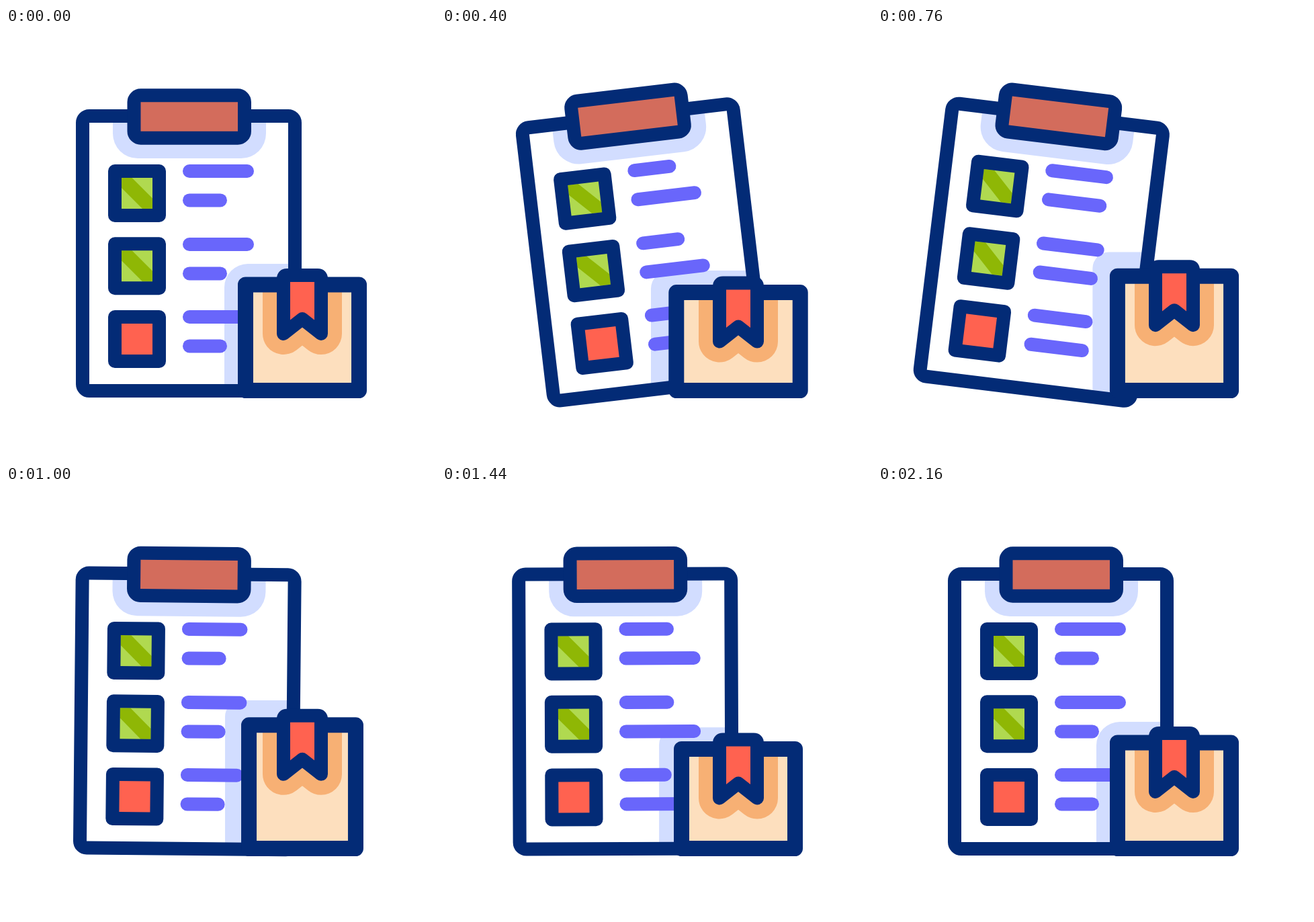
Animation, 640 px wide and 640 px high, one loop 2.24 s. Source, as an HTML page with a canvas:

```html
<!DOCTYPE html>
<html lang="en">
<head>
<meta charset="utf-8">
<title>Checklist and parcel</title>
<style>
html, body { margin: 0; width: 100%; height: 100%; overflow: hidden; background: #fff; }
canvas { display: block; width: 640px; height: 640px; }
</style>
</head>
<body>
<canvas id="stage" width="640" height="640"></canvas>
<script>
const ctx = document.getElementById('stage').getContext('2d');
const LOOP = 2240, STEP = 40;
const NAVY = '#032b76', PALE = '#d2ddff', VIOLET = '#6966fb', RED = '#ff6250';
const PIVOT = [272, 100];

// Eased value through [times], [values], held at both ends
function track(times, values) {
  return t => {
    if (t <= times[0]) return values[0];
    const i = times.findIndex(k => k > t);
    if (i < 0) return values[values.length - 1];
    const x = (t - times[i - 1]) / (times[i] - times[i - 1]);
    return values[i - 1] + (values[i] - values[i - 1]) * x * x * (3 - 2 * x);
  };
}

const swing = track([0, 370, 755, 1170, 1620, 1960], [0, 7, -7, 3.2, -1.4, 0]);
const longLine = track([0, 430, 860, 1290, 1720], [106, 72, 106, 72, 106]);
const shortLine = track([120, 560, 990, 1410, 1820], [66, 122, 66, 122, 66]);

const beats = [200, 490, 940, 1390, 1700];
const boxDrop = track(beats, [0, 15, -28, 10.2, 0]);
const boxWiden = track(beats, [0, 10, -5.3, 0, 0]);
const shadeLeft = track(beats, [325, 306.8, 326.2, 323, 325]);
const shadeTop = track(beats, [351, 364, 317, 360, 351]);
const shadeRadius = track(beats, [35, 25, 24, 25, 35]);

const ribbon = new Path2D('M418 368H464q5 0 5 5V455L441 433 413 455V373q0-5 5-5Z');

function box(x, y, w, h, r = 0) {
  const p = new Path2D();
  p.roundRect(x, y, w, h, r);
  return p;
}

const board = box(114, 131, 316, 409, 10);
const clipPlate = box(190.5, 100.3, 164.5, 63.4, 10);
const clipShade = box(159, 120, 228, 74, [0, 0, 37, 37]);

function fill(path, color) {
  ctx.fillStyle = color;
  ctx.fill(path);
}

function stroke(path, color, width) {
  ctx.strokeStyle = color;
  ctx.lineWidth = width;
  ctx.stroke(path);
}

function turn(angle) {
  ctx.translate(...PIVOT);
  ctx.rotate(angle);
  ctx.translate(-PIVOT[0], -PIVOT[1]);
}

function bar(y, length) {
  stroke(new Path2D(`M273 ${y}h${length - 20}`), VIOLET, 20);
}

function checkbox(y, done) {
  const square = box(162, y, 66, 66);
  fill(square, done ? '#b0d950' : RED);
  if (done) {
    fill(new Path2D(`M172 ${y + 10}h15.5l30.5 30.5v15.5h-15l-31-31Z`), '#8fb705');
  }
  stroke(square, NAVY, 20);
}

function drawBoard(t) {
  const angle = -swing(t) * Math.PI / 180;
  ctx.save();
  turn(angle);
  fill(board, '#fff');

  // The parcel's shadow stays upright but shows only on the board
  ctx.save();
  ctx.clip(board);
  fill(clipShade, PALE);
  turn(-angle);
  fill(box(shadeLeft(t), shadeTop(t), 300, 300, [shadeRadius(t), 0, 0, 0]), PALE);
  ctx.restore();

  [213, 322, 430].forEach((y, i) => {
    bar(y, longLine(t) - (i === 2 ? 4 : 0));
    bar(y + 43.4, shortLine(t));
  });
  [213, 321.3, 430].forEach((y, i) => checkbox(y, i < 2));
  stroke(board, NAVY, 20);
  fill(clipPlate, '#d36c5c');
  stroke(clipPlate, NAVY, 20);
  ctx.restore();
}

function drawParcel(t) {
  const drop = boxDrop(t), wide = boxWiden(t);
  const body = box(356.5 - wide, 382 + drop, 169 + 2 * wide, 157.5 - drop);
  fill(body, '#fddfbe');
  ctx.save();
  ctx.clip(body);
  ctx.translate(0, drop);
  stroke(ribbon, '#f7b074', 62);
  ctx.restore();
  stroke(body, NAVY, 23);

  ctx.save();
  ctx.translate(0, drop);
  fill(ribbon, RED);
  stroke(ribbon, NAVY, 20);
  ctx.restore();
}

function draw(now) {
  const t = Math.floor(now % LOOP / STEP) * STEP;
  ctx.fillStyle = '#fff';
  ctx.fillRect(0, 0, 640, 640);
  ctx.lineJoin = ctx.lineCap = 'round';
  drawBoard(t);
  drawParcel(t);
}

const start = performance.now();
function frame() {
  draw(performance.now() - start);
  requestAnimationFrame(frame);
}
frame();
</script>
</body>
</html>
```
